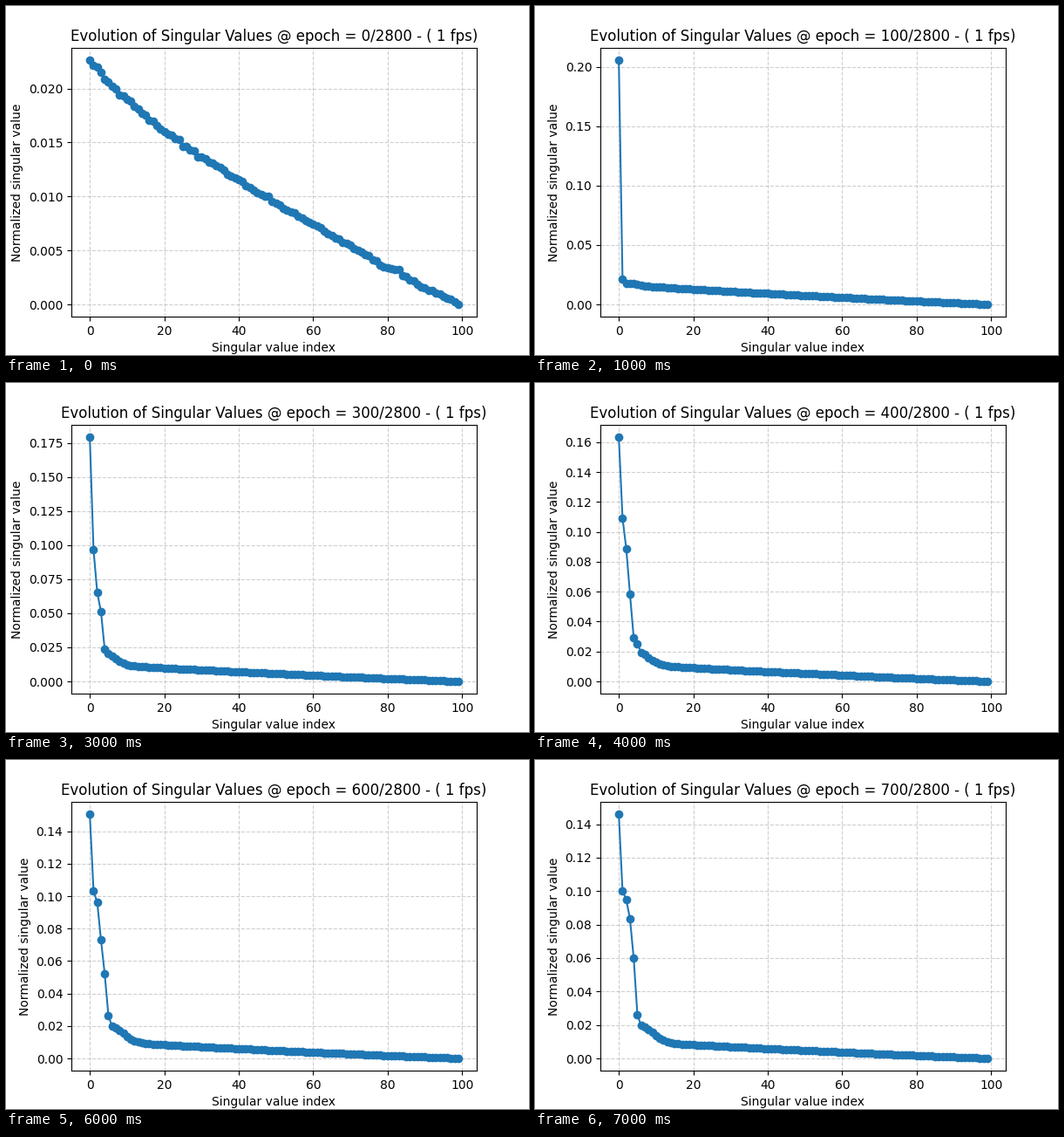
These frames come from a looping animation (600x400 px, 8 s). A matplotlib script:

```python
import numpy as np
import matplotlib.pyplot as plt
from matplotlib.animation import FuncAnimation

COUNT = 100
INDEX = np.arange(COUNT)
STEPS, EPOCH_STEP, EPOCHS = 8, 100, 2800

# Learned modes: key values of the leading singular values along training
KEY_STEPS = [1, 3, 4, 5, 7]
MODES = [
    [0.2058, 0.1794, 0.1635, 0.1552, 0.1460],
    [0.0212, 0.0966, 0.1094, 0.1065, 0.1001],
    [0.0179, 0.0653, 0.0889, 0.0976, 0.0949],
    [0.0177, 0.0512, 0.0585, 0.0627, 0.0834],
    [0.0173, 0.0237, 0.0293, 0.0444, 0.0600],
    [0.0166, 0.0205, 0.0252, 0.0266, 0.0261],
]


def untrained():
    """Slow, slightly uneven descent of a random matrix."""
    u = 1 - INDEX / (COUNT - 1)
    curve = u * (0.78 + 0.12 * u + 0.1 * u**8)
    noise = np.random.default_rng(4).normal(0, 0.005, COUNT)
    noise[[0, -1]] = 0
    return 0.02263 * np.sort(np.clip(curve + noise, 0, 1))[::-1]


def trained(step):
    """Learned modes on top of a bulk that shrinks and grows a shoulder."""
    decay = np.exp(-(step - 1) / 2.2)
    u = (COUNT - 1 - INDEX) / 79
    bulk = (0.008 + 0.0051 * decay) * u * (0.83 + 0.15 * u)
    edge = 10 - 8 * decay
    shoulder = 0.0107 / (1 + np.exp((INDEX - edge) / 1.5))
    values = bulk + shoulder * (u > 0)
    values[:len(MODES)] = [np.interp(step, KEY_STEPS, keys) for keys in MODES]
    return values


fig, ax = plt.subplots(figsize=(6, 4), dpi=100)


def draw(step):
    ax.clear()
    ax.plot(INDEX, trained(step) if step else untrained(), marker="o", color="#1f77b4")
    ax.set_title(f"Evolution of Singular Values @ epoch = {step * EPOCH_STEP}/{EPOCHS} - ( 1 fps)")
    ax.set_xlabel("Singular value index")
    ax.set_ylabel("Normalized singular value")
    ax.grid(True, linestyle="--", alpha=0.6)
    return []


anim = FuncAnimation(fig, draw, frames=STEPS, init_func=lambda: draw(0),
                     interval=1000, repeat=True, repeat_delay=0, blit=False)
plt.show()
```
